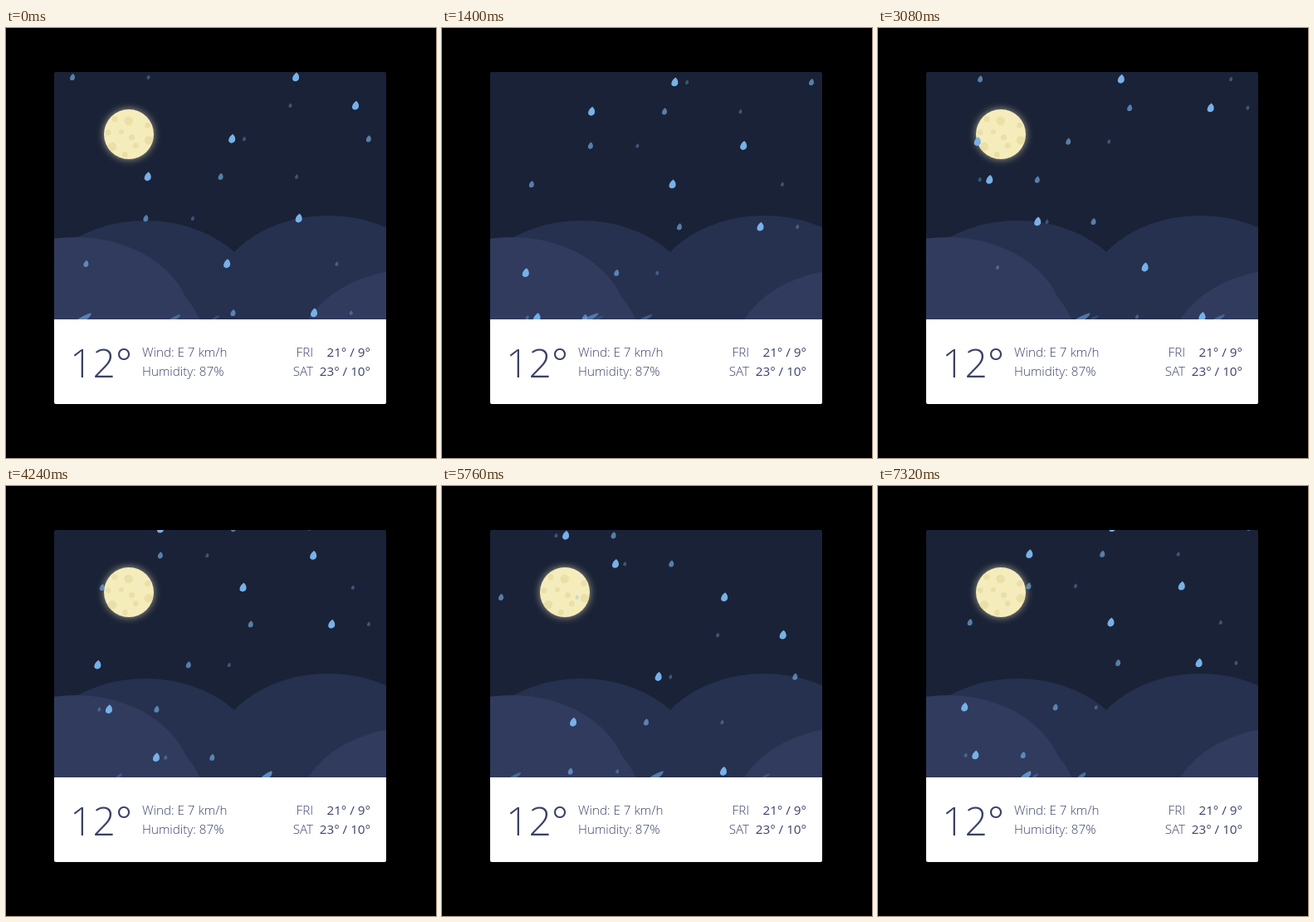
Animation of 518 by 518 pixels, one loop 7360 ms. Source, as an HTML page with a canvas:

```html
<!DOCTYPE html>
<html>
<head>
<meta charset="utf-8">
<style>
  html, body { margin: 0; width: 100%; height: 100%; overflow: hidden; background: #000; }
  canvas { display: block; }
</style>
</head>
<body>
<canvas id="stage" width="518" height="518"></canvas>
<script>
const ctx = document.getElementById('stage').getContext('2d');
const LOOP = 7360, FRAME = 40, RESTART = 320;
const SKY = { x: 58, y: 53, w: 400, h: 298 };
const WAVES = 10; // one wave of three drops every 100 ms
const LARGE = [92, 73, 39, 23, 18, 87, 59, 79, 32, 56]; // percent of the sky's width

// Seeded random number in 0..1
function random(seed) {
  const n = Math.sin(seed * 12.9898) * 43758.5453;
  return n - Math.floor(n);
}

// Waves started so far; the rain holds before the restart and once more after it.
function rainClock(t) {
  if (t < RESTART) return 74 + Math.min(t, 160) / 100;
  if (t < 1280) return 2.5 + (Math.min(t, 1080) - 560) / 100;
  return 12.19 + (t - 1400) / 99.5;
}

// cubic-bezier(.42, 0, 1, 1)
function easeIn(p) {
  let lo = 0, hi = 1;
  for (let i = 0; i < 18; i++) {
    const s = (lo + hi) / 2, r = 1 - s;
    if (1.26 * s * r * r + 3 * s * s * r + s * s * s < p) lo = s; else hi = s;
  }
  return lo * lo * (3 - 2 * lo);
}

function oval(x, y, rx, ry, color) {
  ctx.fillStyle = color;
  ctx.beginPath();
  ctx.ellipse(x, y, rx, ry, 0, 0, Math.PI * 2);
  ctx.fill();
}

function cloud(x, top, color) {
  oval(x, top + 107, 140, 107, color);
}

function crater(angle, distance, r) {
  const a = angle * Math.PI / 180;
  oval(distance * Math.cos(a), distance * Math.sin(a), r, r, '#ebdfa8');
}

function moon(t) {
  if (t >= RESTART && t < 1200) return;
  const left = t < RESTART ? 0 : Math.max(0, 1 - (t - 1200) / 1083);
  const rise = 400 * left * left;
  ctx.save();
  ctx.translate(148 - rise * 0.1, 128 + rise);
  ctx.shadowColor = 'rgba(245, 236, 188, 0.65)';
  ctx.shadowBlur = 10;
  oval(0, 0, 30, 30, '#f5ecbc');
  ctx.shadowBlur = 0;
  ctx.clip();
  crater(45, 5, 3.5);
  crater(198, 9.5, 3);
  for (let i = 0; i < 8; i++) {
    crater(42 * i - 25, i % 5 === 2 ? 16 : 25, i % 3 === 1 ? 5.3 : 3.5);
  }
  ctx.restore();
}

function drop(x, age, scale, alpha) {
  const y = Math.min(349, 7.5 + 400 * easeIn(Math.min(1, age / WAVES)));
  const splash = Math.max(0, (age - 9.1) / 1.3);
  const stretch = 1 + 0.5 * splash;
  const lean = 0.14 + 1.25 * splash;
  ctx.save();
  ctx.translate(x - 0.12 * (y - SKY.y), y);
  ctx.transform(scale * stretch, 0, -lean * stretch * scale, scale, 0, 0);
  ctx.globalAlpha = alpha * (1 - 0.6 * splash);
  ctx.fillStyle = '#76b1e8';
  ctx.beginPath();
  ctx.moveTo(0, -5.8);
  ctx.bezierCurveTo(2.2, -4.2, 4, -1.6, 4, 1.2);
  ctx.bezierCurveTo(4, 6.3, -4, 6.3, -4, 1.2);
  ctx.bezierCurveTo(-4, -1.6, -2.2, -4.2, 0, -5.8);
  ctx.fill();
  ctx.restore();
}

function rain(t) {
  const u = rainClock(t), first = 0.4;
  for (let i = 0; i < WAVES; i++) {
    if (u < i + first) break;
    const age = (u - i - first) % WAVES + first;
    const at = share => SKY.x + SKY.w * share;
    drop(at(LARGE[i] / 100), age, 1, 1);
    drop(at(random(i + 1)), age, 0.75, 0.65);
    drop(at(random(i + 31)), age, 0.5, 0.36);
  }
}

function text(str, x, y, size, weight = 300, align = 'left') {
  ctx.font = `${weight} ${size}px "Open Sans", sans-serif`;
  ctx.textAlign = align;
  ctx.fillText(str, x, y);
}

function panel() {
  ctx.fillStyle = '#fff';
  ctx.fillRect(58, 351, 400, 102);
  ctx.fillStyle = '#3a4168';
  text('12°', 77, 420.5, 48);
  text('Wind: E 7 km/h', 164, 396, 15.2);
  text('Humidity: 87%', 164, 419, 15.2);
  text('FRI', 370, 396, 15.2, 300, 'right');
  text('SAT', 370, 419, 15.2, 300, 'right');
  text('21° / 9°', 439, 396, 15.2, 400, 'right');
  text('23° / 10°', 439, 419, 15.2, 400, 'right');
}

function draw(t) {
  ctx.fillStyle = '#000';
  ctx.fillRect(0, 0, 518, 518);
  ctx.save();
  ctx.beginPath();
  ctx.roundRect(58, 53, 400, 400, 2);
  ctx.clip();

  ctx.save();
  ctx.beginPath();
  ctx.rect(SKY.x, SKY.y, SKY.w, SKY.h);
  ctx.clip();
  ctx.fillStyle = '#1a2237';
  ctx.fillRect(SKY.x, SKY.y, SKY.w, SKY.h);
  moon(t);
  cloud(168, 232, '#26314f');
  cloud(388, 226, '#26314f');
  cloud(84, 252, '#303b5e');
  cloud(100, 277, '#303b5e');
  cloud(490, 291, '#303b5e');
  rain(t);
  ctx.restore();

  panel();
  ctx.restore();
}

const start = performance.now();
function tick() {
  const t = (performance.now() - start) % LOOP;
  draw(Math.floor(t / FRAME) * FRAME);
  requestAnimationFrame(tick);
}
tick();
</script>
</body>
</html>
```
